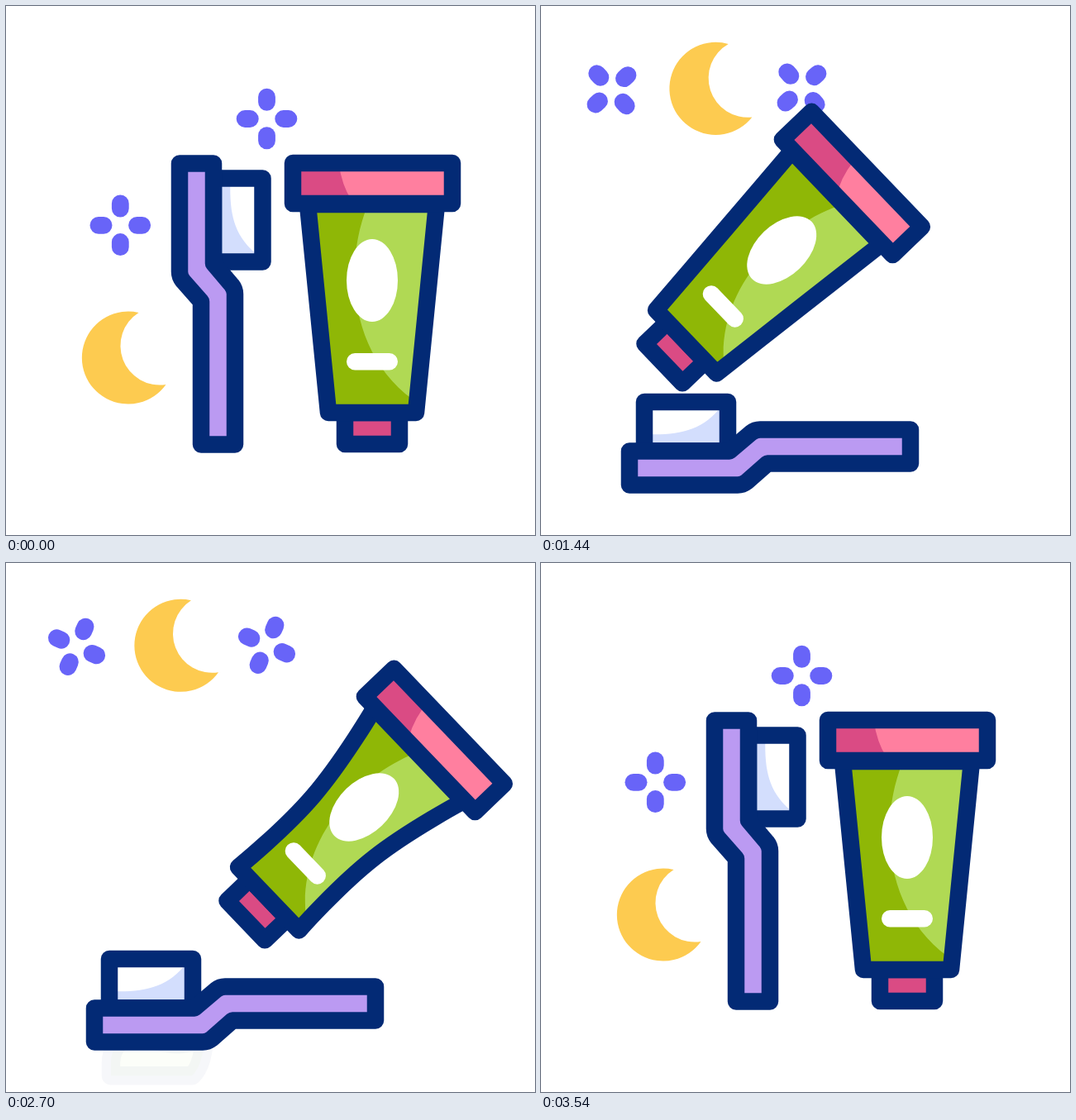
An HTML page with a canvas that plays this animation: 640 by 640 pixels, repeating every 3600 ms.

```html
<!DOCTYPE html>
<html>
<head>
<meta charset="utf-8">
<style>
  html, body { margin: 0; width: 100%; height: 100%; overflow: hidden; background: #fff; }
  canvas { display: block; width: 640px; height: 640px; }
</style>
</head>
<body>
<canvas id="stage" width="640" height="640"></canvas>
<script>
const ctx = document.getElementById('stage').getContext('2d');
const LOOP = 3600;
const NAVY = '#032a75', LIME = '#b0d954', OLIVE = '#8fb706', ROSE = '#da4b84';

const rad = deg => deg * Math.PI / 180;
const mix = (a, b, k) => a + (b - a) * k;

// Eased value at time t through [time, value] keys
function track(t, ...keys) {
  if (t <= keys[0][0]) return keys[0][1];
  for (let i = 1; i < keys.length; i++) {
    const [t0, v0] = keys[i - 1], [t1, v1] = keys[i];
    if (t < t1) {
      const s = (t - t0) / (t1 - t0);
      return mix(v0, v1, s * s * (3 - 2 * s));
    }
  }
  return keys[keys.length - 1][1];
}

function fill(path, color) {
  ctx.fillStyle = color;
  ctx.fill(path);
}

function outline(path, width = 20.5) {
  ctx.strokeStyle = NAVY;
  ctx.lineWidth = width;
  ctx.lineJoin = 'round';
  ctx.stroke(path);
}

// Filled shape with a second tone clipped inside and a navy outline;
// tilt swings the second tone around the lower right of the tube
function shaded(path, color, shade, shadeColor, tilt = 0) {
  fill(path, color);
  ctx.save();
  ctx.clip(path);
  ctx.translate(489, 474);
  ctx.rotate(rad(tilt));
  ctx.translate(-489, -474);
  fill(shade, shadeColor);
  ctx.restore();
  outline(path);
}

function placed(x, y, deg, draw) {
  ctx.save();
  ctx.translate(x, y);
  ctx.rotate(rad(deg));
  draw();
  ctx.restore();
}

const moon = new Path2D('M13-55A56 56 0 1 0 46 32A47.5 47.5 0 0 1 13-55Z');
const petal = new Path2D();
petal.roundRect(-10.4, -36.8, 20.8, 27, 10.4);

const handle = new Path2D('M210 190H251V311L273 337Q277 342 277 348V530H236V357L214 332Q210 327 210 321Z');
const bristles = new Path2D('M251 208H310.5V309H251Z');
const bristleShade = new Path2D('M251 208H271.5C270 250 275 278 306 302V320H251Z');

const cap = new Path2D('M347 190H540V239H347Z');
const capShade = new Path2D('M300 170H400L402 185Q405 215 418 235L425 265H300Z');
const nozzle = new Path2D('M410 492H476V530H410Z');
const bodyShade = new Path2D('M300 235H440C407 310 415 420 492 476L510 510H300Z');
const label = new Path2D();
label.ellipse(443, 332, 31, 50, 0, 0, 7);
label.roundRect(412, 420, 62, 20.5, 10.2);

function star(x, y, deg) {
  placed(x, y, deg, () => {
    for (let i = 0; i < 4; i++) {
      fill(petal, '#6864f8');
      ctx.rotate(Math.PI / 2);
    }
  });
}

function brush(u) {
  placed(260 + 186 * u, 529.5, -90 * u, () => {
    ctx.translate(-260, -529);
    shaded(bristles, '#fff', bristleShade, '#d3defd');
    fill(handle, '#bb9af2');
    outline(handle);
  });
}

function paste(tip, drop) {
  const k = Math.min(1, (tip - 127) / 114);
  const grow = Math.min(1, k * 1.5);
  const lift = 60 * (1 - k);
  const p = (x, y) => [127 + (x - 127) * k, 479 - (479 - y) * grow];
  const path = new Path2D();
  path.moveTo(127, 479);
  path.lineTo(...p(127, 464));
  path.bezierCurveTo(...p(127, 442), ...p(142, 432), ...p(158, 432.5));
  path.bezierCurveTo(...p(180, 433 - lift), ...p(212, 454 - lift), ...p(240, 428));
  path.bezierCurveTo(...p(240, 450), ...p(235, 470), Math.min(225, tip), 479);
  path.closePath();
  ctx.save();
  ctx.globalAlpha = 1 - drop ** 3;
  ctx.translate(0, 143 * drop);
  fill(path, LIME);
  outline(path, 22.5);
  ctx.restore();
}

function tubeBody(squeeze) {
  const x = 377.5 + 13 * squeeze, h = 55 * squeeze, s = h * 0.1;
  const m = v => 886 - v;
  const path = new Path2D();
  path.moveTo(365, 240);
  path.bezierCurveTo(365, 240, x - s, 366 - h, x, 366);
  path.bezierCurveTo(x + s, 366 + h, 390, 492, 390, 492);
  path.lineTo(m(390), 492);
  path.bezierCurveTo(m(390), 492, m(x + s), 366 + h, m(x), 366);
  path.bezierCurveTo(m(x - s), 366 - h, m(365), 240, m(365), 240);
  path.closePath();
  return path;
}

function tube(x, u, squeeze, tilt) {
  placed(x, 182 + 9.6 * u, 46.2 * u, () => {
    ctx.translate(-443, -182);
    fill(nozzle, ROSE);
    outline(nozzle);
    shaded(tubeBody(squeeze), LIME, bodyShade, OLIVE, tilt);
    shaded(cap, '#ff7f9f', capShade, ROSE, tilt);
    fill(label, '#fff');
  });
}

function draw(t) {
  const rise = track(t, [0, 0], [580, 1], [2910, 1], [3540, 0]);
  const rock = (low, high) =>
    track(t, [0, 0], [580, low], [1287, high], [2168, low], [2905, high], [3540, 0]);
  const turn = track(t, [580, 0], [1200, 1], [2850, 1], [3540, 0]);
  const slide = track(t, [1510, 0], [2410, 1]);
  const squeeze = track(t, [1400, 0], [2200, 1], [2850, 1], [3230, 0]);
  const tilt = track(t, [580, 0], [1000, 4.4], [1850, 4.4], [2900, 0]);
  const drop = track(t, [2420, 0], [2720, 1]);
  const tubeX = t < 2600
    ? 443 - 43.5 * turn + 142 * slide
    : 443 + 98.5 * turn + 70 * turn ** 3 * (1 - turn);

  ctx.fillStyle = '#fff';
  ctx.fillRect(0, 0, 640, 640);

  const spin = rock(-160, 66);
  star(mix(138.3, 85.5, rise), mix(265.3, 101.3, rise), spin);
  star(315.5, mix(136.5, 99.4, rise), spin);
  placed(mix(147.5, 211, rise), mix(426, 100.3, rise), rock(-22, 5), () => fill(moon, '#fdcb50'));

  if (t > 1510 && t < 2720) paste(149 + 142 * slide, drop);
  brush(turn);
  tube(tubeX, turn, squeeze, tilt);
}

function frame() {
  draw(performance.now() % LOOP);
  requestAnimationFrame(frame);
}
frame();
</script>
</body>
</html>
```
